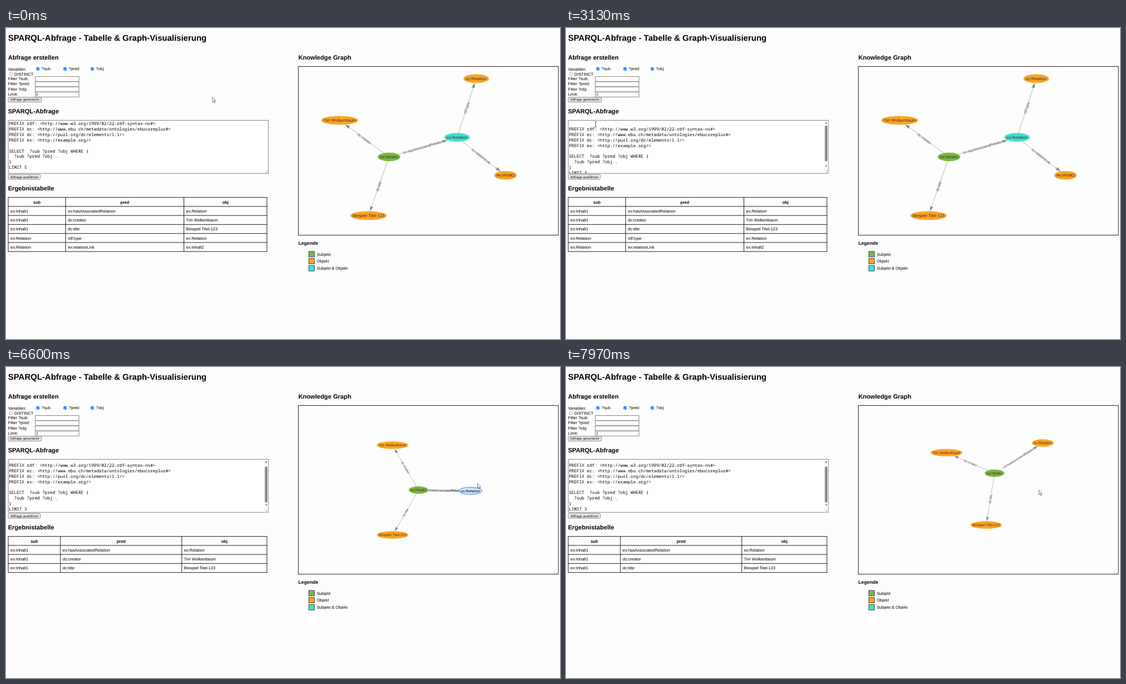
Animation of 998x561 px, one loop 8000 ms. Source, as an HTML page:

```html
<!DOCTYPE html>
<html lang="de">
<head>
<meta charset="utf-8">
<title>SPARQL-Abfrage</title>
<style>
  html, body { margin: 0; width: 100%; height: 100%; overflow: hidden; background: #fdfdfd; }
  svg { display: block; width: 100vw; height: 100vh; }
  text { font: 7.43px "Liberation Sans", Arial, sans-serif; white-space: pre; text-rendering: geometricPrecision; }
  .h1 { font-size: 15px; font-weight: 700; }
  .h2 { font-size: 11.15px; font-weight: 700; }
  .h3 { font-size: 8.69px; font-weight: 700; }
  .th { font-weight: 700; text-anchor: middle; }
  .ui { font-size: 6.2px; }
  .mid { text-anchor: middle; }
  .code { font: 7.72px "Noto Sans Mono", "DejaVu Sans Mono", monospace; }
  .field { fill: #fff; stroke: #767676; stroke-width: .9; }
  .button { fill: #efefef; stroke: #767676; stroke-width: .9; }
  .hover { fill: #e0e0e0; }
  .line { fill: none; stroke: #111; stroke-width: .95; }
  .label { text-anchor: middle; fill: #343434; }
  .edge { paint-order: stroke; stroke: #fff; stroke-width: 1; }
  .bold { font-weight: 700; }
</style>
</head>
<body>
<svg viewBox="0 0 998 561" preserveAspectRatio="none">
  <defs><clipPath id="area"><rect x="4" y="167" width="461" height="95"/></clipPath></defs>
  <g id="page"></g>
  <g id="form"></g>
  <g id="query"></g>
  <g id="table"></g>
  <g id="graph"></g>
  <g id="cursor"></g>
</svg>
<script>
const LOOP = 8000;
const GREEN = '#7cb342', ORANGE = '#ffa320', TURQUOISE = '#40e0d0';
const PERSON = 'Tim Wolkenbaum', TITLE = 'Beispiel Titel-123';

// Moments at which the interface switches state
const FIRST_STEP = 1530, SECOND_STEP = 1900, GENERATE = 2800, SCROLL = 3250,
  EXECUTE = 4930, NEW_GRAPH = 5030, GRAB = 6530, DRAG = 6600, DESELECT = 7870;

const $ = id => document.getElementById(id);
const escapeText = s => s.replace(/&/g, '&amp;').replace(/</g, '&lt;');
const text = (x, y, s, cls = '') => `<text x="${x}" y="${y}" class="${cls}">${escapeText(s)}</text>`;
const rect = (x, y, w, h, attrs) => `<rect x="${x}" y="${y}" width="${w}" height="${h}" ${attrs}/>`;
const path = (d, attrs) => `<path d="${d}" ${attrs}/>`;

const progress = (t, start, end) => Math.min(1, Math.max(0, (t - start) / (end - start)));
const ease = u => u * u * (3 - 2 * u);
const mix = (a, b, u) => a + (b - a) * u;
const inside = ([x, y], left, top, width, height) =>
  x > left && x < left + width && y > top && y < top + height;

const pen = document.createElement('canvas').getContext('2d');
function widthInEm(s, bold) {
  pen.font = `${bold ? 'bold ' : ''}100px "Liberation Sans", Arial, sans-serif`;
  return pen.measureText(s).width / 100;
}

// Redraws a group only when its markup changes
const cache = {};
function put(id, markup) {
  if (cache[id] !== markup) $(id).innerHTML = cache[id] = markup;
}

function drawPage() {
  const legend = [[GREEN, 'Subjekt'], [ORANGE, 'Objekt'], [TURQUOISE, 'Subjekt & Objekt']];
  const checkbox = (name, i) => {
    const x = 57.4 + i * 49;
    return rect(x - 2.8, 70.9, 5.6, 5.6, 'rx="1" fill="#0075ff"') +
      path(`M${x - 1.7} 73.8l1.2 1.2 2.3-2.7`, 'fill="none" stroke="#fff" stroke-width=".9"') +
      text(x + 6.6, 76.3, name);
  };
  put('page',
    text(3.7, 23.3, 'SPARQL-Abfrage - Tabelle & Graph-Visualisierung', 'h1') +
    text(3.7, 56.5, 'Abfrage erstellen', 'h2') +
    text(3.7, 153.7, 'SPARQL-Abfrage', 'h2') +
    text(3.7, 293, 'Ergebnistabelle', 'h2') +
    text(526.7, 56.5, 'Knowledge Graph', 'h2') +
    text(526.7, 391.3, 'Legende', 'h3') +
    text(3.7, 76.9, 'Variablen:') +
    ['?sub', '?pred', '?obj'].map(checkbox).join('') +
    rect(6, 80, 5.3, 5.3, 'rx="1" class="field" style="stroke-width:.6"') +
    text(15, 85.7, 'DISTINCT') +
    ['Filter ?sub:', 'Filter ?pred:', 'Filter ?obj:', 'Limit:']
      .map((s, i) => text(3.7, 94.1 + i * 9.35, s)).join('') +
    rect(526.7, 69.4, 468.4, 304.3, 'class="line"') +
    legend.map(([color, name], i) =>
      rect(545.6, 403 + i * 12.75, 9.8, 9.8, `fill="${color}" stroke="#222" stroke-width=".8"`) +
      text(560, 410.5 + i * 12.75, name)).join(''));
}

function drawForm(t, mouse) {
  const button = (top, width, label) =>
    rect(4.1, top, width, 8.5, `rx="1.2" class="button ${inside(mouse, 4, top, width, 9) ? 'hover' : ''}"`) +
    text(4.1 + width / 2, top + 6.4, label, 'ui mid');
  const focused = t >= FIRST_STEP && t < GENERATE;
  const limit = t < FIRST_STEP ? 5 : t < SECOND_STEP ? 4 : 3;
  let out = '';
  for (let i = 0; i < 4; i++) out += rect(52.8, 87.6 + i * 9.3, 78.6, 8.9, 'class="field"');
  if (focused) out += rect(53, 115.8, 77.8, 8.2, 'rx="1" fill="#fff" stroke="#101010" stroke-width="1.4"');
  if (focused || inside(mouse, 53, 115, 78, 9))
    out += rect(124.6, 116.6, 5, 6.6, 'fill="#efefef"') +
      path('M125.8 119l1.3-1.5 1.3 1.5zM125.8 120.8l1.3 1.5 1.3-1.5z', 'fill="#606060"');
  put('form', out + text(54.3, 122.1, String(limit), 'ui') +
    button(125, 59.4, 'Abfrage generieren') + button(264.2, 57.6, 'Abfrage ausführen'));
}

function drawQuery(t) {
  const generated = t >= GENERATE;
  const scroll = ease(progress(t, SCROLL, SCROLL + 200));
  const lines = [
    'PREFIX rdf: <http://www.w3.org/1999/02/22-rdf-syntax-ns#>',
    'PREFIX ec: <http://www.ebu.ch/metadata/ontologies/ebucoreplus#>',
    'PREFIX dc: <http://purl.org/dc/elements/1.1/>',
    'PREFIX ex: <http://example.org/>',
    '',
    'SELECT  ?sub ?pred ?obj WHERE {',
    '  ?sub ?pred ?obj .',
    '}',
    'LIMIT ' + (generated ? 3 : 5)
  ];
  const first = generated ? 185.1 - 5.1 * scroll : 175.2;
  let out = rect(4.1, 166.6, 468.6, 95.6, 'class="field"') + '<g clip-path="url(#area)">' +
    lines.map((s, i) => text(5.2, first + i * 9.86, s, 'code')).join('') + '</g>';
  if (generated)
    out += rect(465.2, 167.2, 7, 94.5, 'fill="#fafafa"') +
      rect(466.3, 175.8 + 3.8 * scroll, 4.7, 65, 'rx="2.3" fill="#8b8b8b"') +
      path('M466.4 172.4l2.2-2.8 2.2 2.8zM466.4 247.8l2.2 2.8 2.2-2.8z', 'fill="#777"') +
      rect(465.2, 253.6, 7, 8.1, 'fill="#f4f4f4"');
  put('query', out + path('M467.8 261.4l4-4M470 261.4l1.8-1.8', 'stroke="#888" stroke-width=".6"'));
}

function drawTable(t) {
  const rows = [
    ['ex:Inhalt1', 'ex:hasAssociatedRelation', 'ex:Relation'],
    ['ex:Inhalt1', 'dc:creator', PERSON],
    ['ex:Inhalt1', 'dc:title', TITLE],
    ['ex:Relation', 'rdf:type', 'ec:Relation'],
    ['ex:Relation', 'ex:relationLink', 'ex:Inhalt2']
  ].slice(0, t < EXECUTE ? 5 : 3);
  const cols = t < EXECUTE ? [4, 107.4, 320.5, 470.1] : [4, 98, 316.7, 470.1];
  const top = 305.6, pitch = 16.27, bottom = top + pitch * (rows.length + 1);
  let d = cols.map(x => `M${x} ${top}V${bottom}`).join('');
  for (let i = 0; i <= rows.length + 1; i++) d += `M3.6 ${top + i * pitch}H470.5`;
  put('table', path(d, 'class="line"') +
    ['sub', 'pred', 'obj'].map((s, i) => text((cols[i] + cols[i + 1]) / 2, 316.5, s, 'th')).join('') +
    rows.map((row, r) => row.map((s, c) =>
      text(cols[c] + 4, 332.9 + r * pitch, s)).join('')).join(''));
}

const node = (name, color, x, y) => ({ name, color, x, y });

const fullGraph = {
  size: 7.55,
  nodes: [
    node('ex:Inhalt1', GREEN, 690, 232.5),
    node('ex:Relation', TURQUOISE, 812.5, 197.2),
    node(PERSON, ORANGE, 601, 166.6),
    node(TITLE, ORANGE, 653, 338.4),
    node('ec:Relation', ORANGE, 847, 91.3),
    node('ex:Inhalt2', ORANGE, 899.8, 265.7)
  ],
  edges: [[0, 1, 'ex:hasAssociatedRelation'], [0, 2, 'dc:creator'], [0, 3, 'dc:title'],
    [1, 4, 'rdf:type'], [1, 5, 'ex:relationLink']]
};

// A three-armed star that is pulled through a middle pose and then settles
const arm = (name, degrees, middle, end) => {
  const angle = degrees * Math.PI / 180;
  return { ...node(name, ORANGE, 743 + 93.5 * Math.cos(angle), 222 + 93.5 * Math.sin(angle)), middle, end };
};
const smallGraph = {
  size: 6.5,
  nodes: [
    { ...node('ex:Inhalt1', GREEN, 743, 222), middle: [768.5, 213.5], end: [772, 191.5] },
    arm('ex:Relation', 1, [859, 174.5], [859, 137]),
    arm(PERSON, -120, [701, 147.5], [685.5, 154.5]),
    arm(TITLE, 120, [718, 294], [757, 285])
  ],
  edges: fullGraph.edges.slice(0, 3)
};

function settle(n, t) {
  if (!n.end) return [n.x, n.y];
  const pull = progress(t, DRAG, DRAG + 230);
  const rest = 1 - (1 - progress(t, DRAG + 230, DRAG + 1100)) ** 3;
  return [n.x, n.y].map((from, i) => mix(mix(from, n.middle[i], pull), n.end[i], rest));
}

function drawEdge(from, to, label, size, bend) {
  const angle = Math.atan2(to.y - from.y, to.x - from.x);
  const cos = Math.cos(angle), sin = Math.sin(angle);
  const radius = to.rx * to.ry / Math.hypot(to.ry * cos, to.rx * sin);
  const tipX = to.x - radius * cos, tipY = to.y - radius * sin;
  const midX = (from.x + to.x) / 2 - bend * sin, midY = (from.y + to.y) / 2 + bend * cos;
  const deg = angle * 180 / Math.PI, unit = size / 14, head = 18 * unit;
  const turn = Math.abs(deg) > 90 ? deg + 180 : deg;
  const color = to.selected ? '#444' : '#848484';
  return path(`M${from.x} ${from.y}Q${midX - bend * sin} ${midY + bend * cos} ${tipX - head * .8 * cos} ${tipY - head * .8 * sin}`,
      `fill="none" stroke="${color}" stroke-width="${unit * (to.selected ? 2 : 1.1)}"`) +
    path(`M0 0L${-head} ${head * .3}L${-head * .9} 0L${-head} ${-head * .3}z`,
      `fill="${color}" transform="translate(${tipX} ${tipY}) rotate(${deg})"`) +
    `<text class="label edge ${to.selected ? 'bold' : ''}" style="font-size:${12 * unit}px"
      transform="translate(${midX} ${midY}) rotate(${turn})" y="${4.2 * unit}">${label}</text>`;
}

function drawNode(n, size) {
  const [fill, stroke, width] = n.selected ? ['#d2e5ff', '#2b7ce9', 2] : [n.color, n.color, 1];
  return `<ellipse cx="${n.x}" cy="${n.y}" rx="${n.rx}" ry="${n.ry}"
      fill="${fill}" stroke="${stroke}" stroke-width="${width * size / 14}"/>` +
    `<text x="${n.x}" y="${n.y + size * .34}" class="label ${n.selected ? 'bold' : ''}"
      style="font-size:${size}px">${n.name}</text>`;
}

function drawGraph(t) {
  if (t >= EXECUTE && t < NEW_GRAPH) return put('graph', '');
  const { size, nodes, edges } = t < EXECUTE ? fullGraph : smallGraph;
  const placed = nodes.map((n, i) => {
    const [x, y] = settle(n, t), selected = i === 1 && t >= GRAB && t < DESELECT;
    return { ...n, x, y, selected, rx: (widthInEm(n.name, selected) + 1) / 2 * size, ry: size };
  });
  // The pulled edge sags while its end moves
  const sag = 4 * Math.sin(Math.PI * progress(t, DRAG, DRAG + 600));
  put('graph',
    edges.map(([a, b, label]) =>
      drawEdge(placed[a], placed[b], label, size, placed[b].selected ? sag : 0)).join('') +
    placed.map(n => drawNode(n, size)).join(''));
}

// Each move: start, end, destination x and y, optional downward arc
const START = [372, 125];
const moves = [
  [530, 1230, 127, 120.5],
  [1950, 2540, 41.5, 127, 12],
  [2830, 3450, 66.5, 225],
  [3630, 3830, 66, 235],
  [4070, 4650, 44.5, 268.5],
  [5370, 6170, 843, 255, 55],
  [6200, 6450, 848, 222],
  [6450, 7100, 859, 134],
  [7250, 7680, 852, 222]
];

function pointer(t) {
  let [x, y] = START;
  for (const [start, end, toX, toY, arc = 0] of moves) {
    const u = ease(progress(t, start, end));
    x = mix(x, toX, u);
    y = mix(y, toY, u) + arc * Math.sin(Math.PI * u);
  }
  return [x, y];
}

function drawCursor(mouse) {
  const shape = inside(mouse, 4, 167, 461, 95)
    ? path('M-1.8-5Q0-5 0-4Q0-5 1.8-5M0-4.2V4.2M-1.8 5Q0 5 0 4Q0 5 1.8 5', 'fill="none" stroke="#222" stroke-width=".8"')
    : path('M0 0V8.6L2 6.8L3.4 9.9L4.7 9.3L3.4 6.3H6z', 'fill="#fff" stroke="#333" stroke-width=".65"');
  put('cursor', `<g transform="translate(${mouse})">${shape}</g>`);
}

function draw() {
  const t = performance.now() % LOOP;
  const mouse = pointer(t);
  drawForm(t, mouse);
  drawQuery(t);
  drawTable(t);
  drawGraph(t);
  drawCursor(mouse);
  requestAnimationFrame(draw);
}

drawPage();
draw();
</script>
</body>
</html>
```
